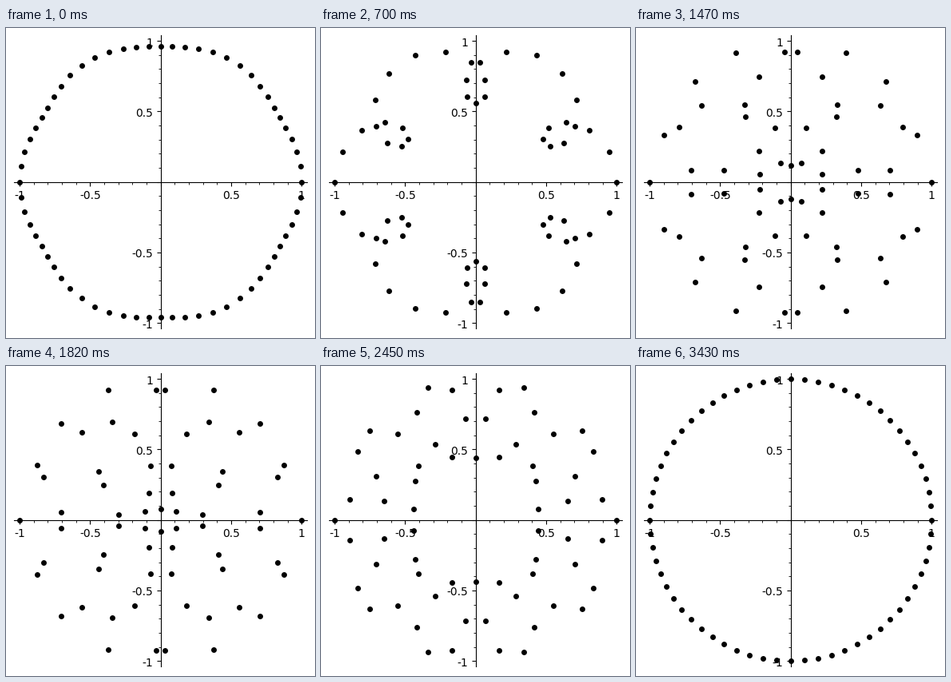
Animation, 387 px wide and 388 px high, one loop 3500 ms. Source, as a matplotlib script:

```python
import numpy as np
import matplotlib.pyplot as plt
from matplotlib.animation import FuncAnimation
from matplotlib.ticker import AutoMinorLocator, FuncFormatter, MultipleLocator
from matplotlib.transforms import ScaledTranslation

WIDTH, HEIGHT, DPI = 387, 388, 100
FRAMES, INTERVAL = 50, 70
CENTER_X, CENTER_Y, UNIT = 193.695, 192.69, 176.5  # pixels, from the top left
LIMIT = 1.04
LABEL_DROP = 0.93  # pixels
POINTS, POWER = 64, 7

plt.rcParams["font.family"] = "DejaVu Sans"

circle = np.exp(2j * np.pi * np.arange(POINTS) / POINTS)
wound = circle ** POWER


def blend(frame):
    """Straight-line homotopy from z to z**POWER."""
    t = (frame + 1) / FRAMES
    z = (1 - t) * circle + t * wound
    return np.column_stack([z.real, z.imag])


def tick_label(value, _):
    return "" if abs(value) < 1e-9 else f"{value:g}"


def style_axis(axis):
    axis.set_major_locator(MultipleLocator(0.5))
    axis.set_minor_locator(AutoMinorLocator(5))
    axis.set_major_formatter(FuncFormatter(tick_label))
    drop = ScaledTranslation(0, -LABEL_DROP / DPI, fig.dpi_scale_trans)
    for label in axis.get_ticklabels():
        label.set_transform(label.get_transform() + drop)


fig = plt.figure(figsize=(WIDTH / DPI, HEIGHT / DPI), dpi=DPI, facecolor="white")
half = LIMIT * UNIT
ax = fig.add_axes([
    (CENTER_X - half) / WIDTH,
    (HEIGHT - CENTER_Y - half) / HEIGHT,
    2 * half / WIDTH,
    2 * half / HEIGHT,
])
ax.set(xlim=(-LIMIT, LIMIT), ylim=(-LIMIT, LIMIT))
ax.spines[["top", "right"]].set_visible(False)
ax.spines[["left", "bottom"]].set_position("zero")
ax.spines[["left", "bottom"]].set_linewidth(0.8)
style_axis(ax.xaxis)
style_axis(ax.yaxis)

start = blend(0)
dots = ax.scatter(start[:, 0], start[:, 1], s=25, c="black", linewidths=0, zorder=5)


def update(frame):
    dots.set_offsets(blend(frame))
    return (dots,)


anim = FuncAnimation(fig, update, frames=FRAMES, interval=INTERVAL,
                     repeat=True, repeat_delay=0, blit=False)
plt.show()
```
